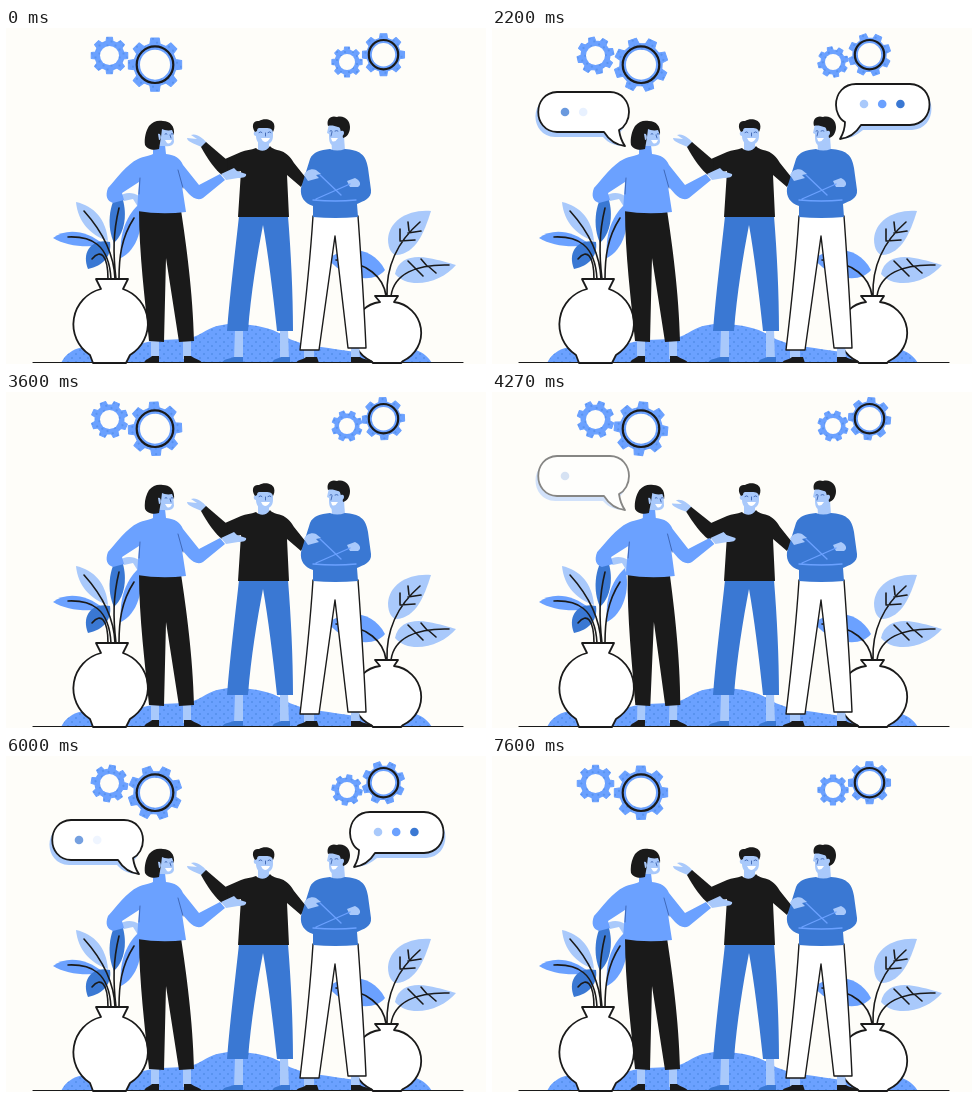
Write an HTML page that moves like this. It is 480 by 336 pixels and loops after 7630 ms.

```html
<!DOCTYPE html>
<html lang="en">
<head>
<meta charset="utf-8">
<title>Team talk</title>
<style>
  html, body { margin: 0; width: 100%; height: 100%; overflow: hidden; background: #fefdf9; }
  svg { display: block; width: 480px; height: 336px; }
  .k { fill: #1a1a1a; }
  .b { fill: #6ba1ff; }
  .m { fill: #3a78d3; }
  .p { fill: #a9c9fb; }
  .w { fill: #fff; }
  .o { fill: #fff; stroke: #1a1a1a; stroke-width: 1.8; stroke-linejoin: round; }
  .l { fill: none; stroke: #1a1a1a; stroke-width: 1.6; stroke-linecap: round; stroke-linejoin: round; }
  .s { fill: none; stroke: #6ba1ff; stroke-width: 1.3; stroke-linecap: round; }
  .f { fill: none; stroke: #3a62b0; stroke-width: .9; stroke-linecap: round; }
</style>
</head>
<body>
<svg viewBox="0 0 480 336">
  <defs>
    <pattern id="dots" width="8" height="8" patternUnits="userSpaceOnUse">
      <circle cx="2" cy="2" r=".7" class="m"/><circle cx="6" cy="6" r=".7" class="m"/>
    </pattern>
    <path id="hill" d="M55 335C61 323 73 317 88 320C112 326 135 313 155 312C172 311 185 312 196 305C208 297 222 295 235 296C250 297 265 300 275 306C287 314 300 317 315 319C335 322 355 325 370 326C388 327 399 318 410 322C418 325 423 330 426 335Z"/>
  </defs>

  <g id="gears"></g>
  <use href="#hill" class="b"/><use href="#hill" fill="url(#dots)"/>

  <!-- left plant -->
  <path class="b" d="M47 210C60 200 81 202 98 217C79 220 60 218 47 210Z"/>
  <path class="p" d="M70 174C88 178 100 191 102 213C84 207 72 194 70 174Z"/>
  <path class="b" d="M133 176C139 198 131 222 115 230C113 210 118 190 133 176Z"/>
  <path class="m" d="M113 163C122 178 121 203 108 215C101 200 102 177 113 163Z"/>
  <path class="m" d="M82 241C75 224 86 210 104 214C106 228 97 238 82 241Z"/>
  <path class="l" d="M62 209C85 208 103 216 105 251M78 183C96 203 108 225 109 251M113 180C107 205 107 225 110 251M128 190C115 210 113 230 113 251M86 231C95 220 102 228 102 251"/>
  <path class="o" d="M90 251H122L117 261A36.500 36.500 0 0 1 124 327L120 335H87L84 327A36.500 36.500 0 0 1 95 261Z"/>

  <!-- right plant -->
  <path class="b" d="M322 231C338 218 366 217 379 242C368 256 340 252 322 231Z"/>
  <path class="p" d="M425 183C402 181 383 193 382 211C382 221 386 227 391 227C410 225 418 205 425 183Z"/>
  <path class="p" d="M389 246C392 230 408 227 422 230C434 232 443 235 450 237C436 254 404 263 389 246Z"/>
  <path class="l" d="M381 268C380 240 391 214 414 194M394 212V201M403 203L402 194M394 213L409 212M402 205L415 203M385 268C388 246 410 236 443 237M409 240L402 233M421 238L415 231M409 240L417 248M422 238L430 245M380 268C378 250 362 234 330 232"/>
  <path class="o" d="M369 268H392L388 274A31 31 0 0 1 397 333L395 335H367L365 333A31 31 0 0 1 374 274Z"/>

  <!-- middle man -->
  <path class="p" d="M229 301H237V332H228ZM274 301H282L283 332H274Z"/>
  <path class="m" d="M216 335C217 331 223 331 228 329H237V335ZM266 335C267 331 271 331 275 329H284V335Z"/>
  <path class="m" d="M233 188H282C285 225 287 265 287 303H271C267 265 262 225 257 197C251 228 245 265 242 303H221C224 265 229 225 233 188Z"/>
  <path class="p" d="M252 110H263V124H252Z"/>
  <path class="k" d="M250 120C254 124 260 124 264 118C266 122 276 122 279 125C284 128 286 132 288 135L300 150L295 159L281 147L283 189H232L235 143L217 147C212 144 213 134 219 131L235 124C240 122 245 122 250 120Z"/>
  <g id="forearm">
    <path class="p" d="M201 115C196 109 190 105 185 107L191 111L181 110C181 113 186 115 198 120Z"/>
    <path class="k" d="M195 119L200 114L221 132L222 144L216 147C210 143 201 130 195 119Z"/>
  </g>
  <path class="p" d="M250 98H267V108C267 114 263 117 258 117C252 117 250 112 250 108C247 108 247 103 250 103Z"/>
  <path class="k" d="M249 104C245 98 247 92 253 93C258 90 266 91 268 96C269 99 268 102 267 104C266 100 263 100 258 100C254 100 251 99 251 103Z"/>
  <path class="f" d="M253 104.500Q255 103 256 104.500M262 104.500Q264 103 265 104.500M259.500 105V108"/>
  <path class="w" d="M255 110H264Q262 114 259 114Q256 113 255 110Z"/>

  <!-- right man -->
  <path class="p" d="M298 320H308V332H298ZM345 316H353L354 331H345Z"/>
  <path class="k" d="M290 335C292 331 297 332 300 329H311L313 335ZM345 335V329H354C358 332 366 331 368 335Z"/>
  <path class="o" style="stroke-width:1.4" d="M307 188C304 235 299 280 294 322H313L329 208L342 320H360C358 275 355 230 352 188Z"/>
  <path class="p" d="M325 108H338L339 123H326Z"/>
  <path class="m" d="M324 121Q331 124 339 121C353 122 360 126 362 140L365 162C366 171 357 173 351 176L352 189Q329 191 307 189V178C298 175 294 169 295 160L304 131C307 124 314 122 324 121Z"/>
  <path class="p" d="M298 147C300 142 306 140 310 142L315 146L310 147L313 150L302 153ZM341 153L349 150C354 152 356 157 352 159L344 159Z"/>
  <path class="s" d="M314 147L335 167M310 171L344 156M307 172Q330 174 350 172"/>
  <path class="p" d="M323 96H338V110C335 116 332 119 326 117C323 115 323 111 323 106L321 105Z"/>
  <path class="k" d="M322 98C320 91 325 87 331 89C339 87 344 93 344 99C344 105 341 109 337 110L336 104C334 104 335 99 332 99C329 98 325 97 322 98Z"/>
  <path class="p" d="M335 103C339 101 339 108 335 108Z"/>
  <path class="f" d="M324 103Q325 102 326 103M329 103Q331 102 332 103M326 104L325 108"/>
  <path class="w" d="M325 110H332Q329 115 326 113Z"/>

  <!-- woman -->
  <g id="woman">
    <path class="p" d="M145 312H153V331H145ZM177 312H185V331H177Z"/>
    <path class="k" d="M138 335C139 331 143 331 146 328H153V335ZM178 335V328H185C189 331 195 332 196 335Z"/>
    <path class="k" d="M133 182H175C180 215 187 265 188 313L173 314L160 230L158 314L143 313C139 272 133 225 133 182Z"/>
    <path class="p" d="M113 169C118 164 127 164 133 168L132 179L127 171L118 173Z"/>
    <path class="b" d="M147 117H159L160 126C169 127 174 130 177 137L193 157L214 146L219 152L197 170C192 173 187 170 183 166L176 158L180 184Q155 187 131 183L133 154L116 165L118 172L107 175C101 173 99 168 102 160C110 151 121 136 132 131C138 128 143 128 147 126Z"/>
    <path class="f" d="M134 150L133 166M172 142L177 160"/>
    <path class="p" d="M215 146L228 140L231 143L240 146C241 149 237 150 232 150L220 152Z"/>
    <path class="p" d="M152 100H167L168 114C167 118 163 119 158 118H151Z"/>
    <path class="k" d="M139 117C138 110 140 103 143 98C147 93 152 92 157 93C164 93 169 98 168 107L166 102C162 103 158 102 156 101L155 109L153 121C147 123 141 121 139 117Z"/>
    <path class="p" d="M152 106C155 104 156 112 153 112Z"/>
    <path class="f" d="M159 106Q160 105 161 106M165 106Q166 105 167 106M164 107L165 110"/>
    <path class="w" d="M159 112H166Q164 117 161 115Z"/>
  </g>
  <path class="l" style="stroke-width:1.2" d="M27 334.500H457"/>

  <g id="left">
    <path class="p" d="M63 68H117C130 68 136 78 135 88C134 98 130 104 125 106L133 118C123 118 116 115 111 109H63C37 108 37 69 63 68Z"/>
    <path class="o" d="M65 64H118C130 64 137 74 137 84C137 92 133 99 127 102C128 109 130 114 133 118C124 117 117 112 112 104H65C40 103 40 65 65 64Z"/>
  </g>
  <g id="right">
    <path class="p" d="M366 60H420C446 61 446 101 420 102H371C365 107 358 111 348 111L355 98Z"/>
    <path class="o" d="M364 56H418C444 57 444 96 418 97H369C364 105 357 110 348 111C351 106 353 101 353 94C347 91 344 83 344 77C344 65 352 56 364 56Z"/>
  </g>
</svg>
<script>
const LOOP = 7630, CYCLE = LOOP / 2;
const $ = id => document.getElementById(id);

function add(parent, tag, attrs) {
  const el = document.createElementNS('http://www.w3.org/2000/svg', tag);
  for (const name in attrs) el.setAttribute(name, attrs[name]);
  return parent.appendChild(el);
}

// Eased progress from 0 to 1 between two times
function ramp(t, from, to) {
  const u = Math.min(1, Math.max(0, (t - from) / (to - from)));
  return u * u * (3 - 2 * u);
}
const pulse = (t, a, b, c, d) => ramp(t, a, b) - ramp(t, c, d);

function gearPath(R) {
  const points = [];
  for (let i = 0; i < 8; i++) {
    for (const [r, deg] of [[.79, -14], [1, -9], [1, 9], [.79, 14]]) {
      const a = (i * 45 + deg) * Math.PI / 180;
      points.push((r * R * Math.cos(a)).toFixed(2) + ' ' + (r * R * Math.sin(a)).toFixed(2));
    }
  }
  return 'M' + points.join('L') + 'Z';
}

// teeth: how many teeth the gear advances per loop
function makeGear(x, y, R, hole, ring, teeth) {
  const g = add($('gears'), 'g', { transform: `translate(${x} ${y})` });
  const wheel = add(g, 'g', {});
  const d = gearPath(R);
  add(wheel, 'path', { d, class: 'b', stroke: '#6ba1ff', 'stroke-linejoin': 'round' });
  add(wheel, 'path', { d, fill: 'url(#dots)' });
  if (ring) add(g, 'circle', { r: ring, class: 'l', style: 'stroke-width:2.2' });
  add(g, 'circle', { r: hole, fill: '#fefdf9' });
  return { wheel, teeth };
}

const gears = [
  makeGear(103.5, 27.5, 18.5, 9.5, 0, -1),
  makeGear(149, 36.7, 27, 15, 18.3, 2),
  makeGear(341, 34, 15.3, 8, 0, -1),
  makeGear(377.5, 26.7, 21.3, 11.7, 14.7, 2)
];

const makeDots = (id, x, y, colours) => colours.map((c, i) =>
  add($(id), 'circle', { cx: x + i * 18.2, cy: y, r: 4.3, class: c }));
const leftDots = makeDots('left', 73, 84, ['m', 'b', 'p']);
const rightDots = makeDots('right', 372, 76, ['p', 'b', 'm']);

function draw(now) {
  const time = now % LOOP, t = time % CYCLE;

  for (const { wheel, teeth } of gears)
    wheel.setAttribute('transform', `rotate(${teeth * 45 * time / LOOP})`);

  const lean = .0356 * pulse(t, 130, 760, 1150, 1780);
  $('woman').setAttribute('transform', `matrix(1 0 ${-lean} 1 ${330 * lean} 0)`);
  $('forearm').setAttribute('transform', `rotate(${-9 * pulse(t, 250, 900, 950, 1350)} 218 140)`);

  $('left').setAttribute('opacity', pulse(t, 250, 650, 3210, 3590));
  $('right').setAttribute('opacity', pulse(t, 1150, 1550, 3210, 3590));

  // Dots appear in turn, fade away and come back
  leftDots.forEach((dot, i) => dot.setAttribute('opacity',
    pulse(t, 350 + i * 130, 600 + i * 130, 1200 + i * 130, 1500 + i * 130)
    + ramp(t, 1950 + i * 160, 2320 + i * 160)));
  rightDots.forEach((dot, i) => dot.setAttribute('opacity',
    pulse(t, 1170 + i * 90, 1400 + i * 90, 2420 + i * 90, 2640 + i * 90)
    + ramp(t, 2740 + i * 90, 2980 + i * 90)));
}

const start = performance.now();
function tick() {
  draw(performance.now() - start);
  requestAnimationFrame(tick);
}
tick();
</script>
</body>
</html>
```
